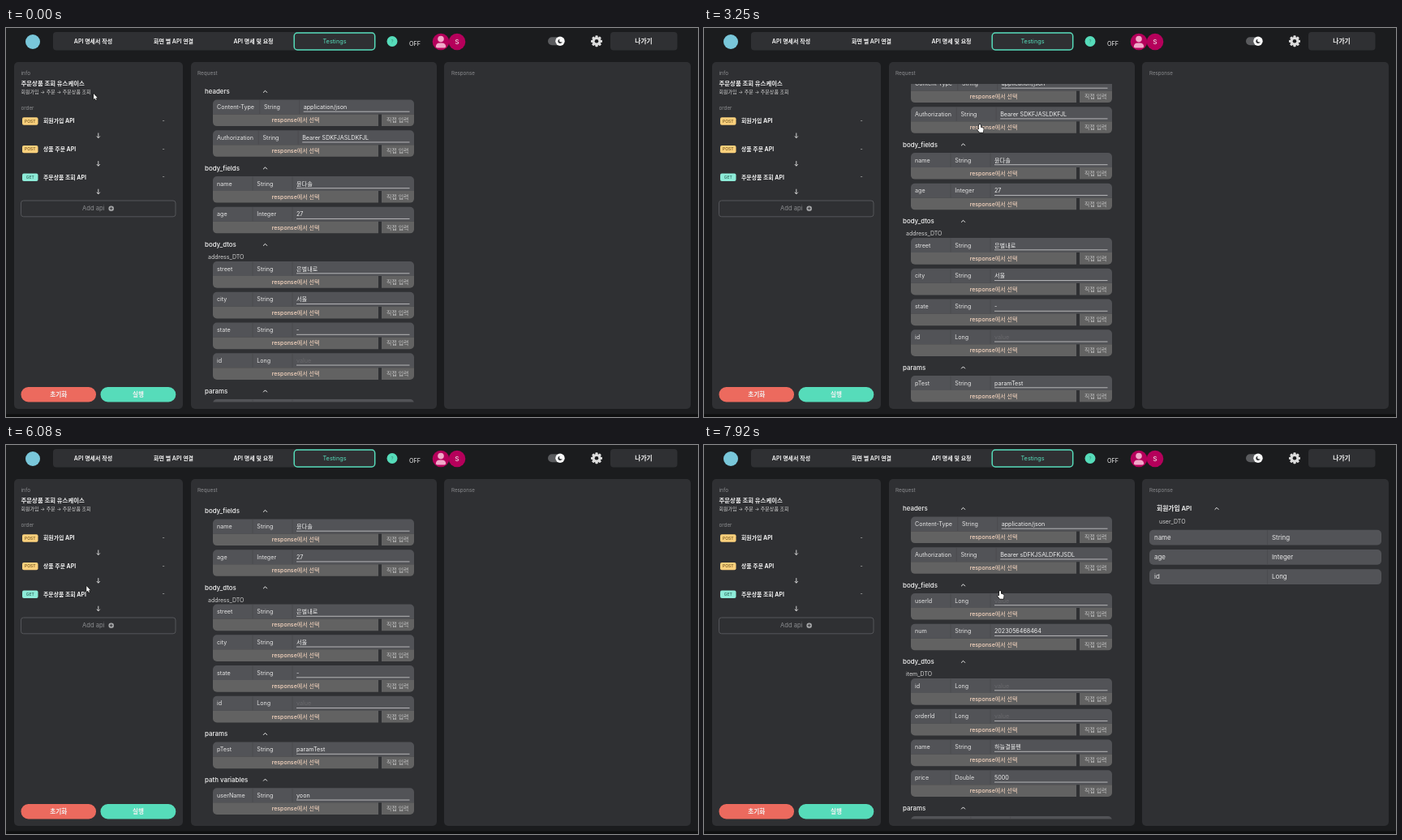
Write an HTML page with a canvas that moves like this. It is 853 px wide and 480 px high and loops after 8000 ms.

```html
<!DOCTYPE html>
<html lang="ko">
<head>
<meta charset="utf-8">
<title>API testing screen</title>
<style>
html, body { margin: 0; width: 100%; height: 100%; overflow: hidden; background: #1b1c1e; }
canvas { display: block; width: 853px; height: 480px; }
</style>
</head>
<body>
<canvas id="stage"></canvas>
<script>
const W = 853, H = 480, LOOP = 8000, FRAMES = 96, STEP = LOOP / FRAMES;
const FONT = 'Inter, "Noto Sans CJK KR", "Noto Sans CJK JP", "Noto Sans CJK", sans-serif';
const PAGE = '#1b1c1e', PANEL = '#2f3033', CARD = '#525357', STRIP = '#626262';
const MINT = '#56dcba', PINK = '#b5005b', WHITE = '#f2f2f2', GRAY = '#8b8c8f';
const CLICK = 77;

const canvas = document.getElementById('stage');
const ctx = canvas.getContext('2d');
const ratio = window.devicePixelRatio || 1;
canvas.width = Math.round(W * ratio);
canvas.height = Math.round(H * ratio);

const AUTH = 'Bearer ';
const headerRows = token => [
  ['Content-Type', 'String', 'application/json', 318],
  ['Authorization', 'String', AUTH + token, 316.5]
];
// Row: name, type, value, x of the type column
const signUp = [
  { title: 'headers', rows: headerRows('SDKFJASLDKFJL') },
  { title: 'body_fields', rows: [['name', 'String', '윤다솔'], ['age', 'Integer', '27']] },
  { title: 'body_dtos', sub: 'address_DTO', rows: [
    ['street', 'String', '은별내로'], ['city', 'String', '서울'],
    ['state', 'String', '-'], ['id', 'Long', '']] },
  { title: 'params', rows: [['pTest', 'String', 'paramTest']] },
  { title: 'path variables', rows: [['userName', 'String', 'yoon']] }
];
const itemOrder = [
  { title: 'headers', rows: headerRows('sDFKJSALDFKJSDL') },
  { title: 'body_fields', rows: [['userId', 'Long', ''], ['num', 'String', '2023056468464']] },
  { title: 'body_dtos', sub: 'item_DTO', rows: [
    ['id', 'Long', ''], ['orderId', 'Long', ''],
    ['name', 'String', '하늘결볼펜'], ['price', 'Double', '5000']] },
  { title: 'params', rows: [['userAddressStreet', 'String', '은별내로', 334]] }
];
const steps = [['POST', '회원가입 API'], ['POST', '상품 주문 API'], ['GET', '주문상품 조회 API']];
const stepY = i => 115 + i * 34.6;

// Keys: step, then values
const cursorKeys = [
  [0, 108, 81], [4, 72, 82], [9, 60, 112], [12, 62, 113], [15, 70, 147], [18, 72, 148],
  [21, 74, 181], [23, 80, 184], [27, 334, 106], [28, 340, 104], [31, 340, 104],
  [34, 340, 119], [46, 340, 119], [49, 290, 112], [52, 468, 150], [54, 440, 260],
  [57, 356, 362], [61, 353, 359], [64, 350, 385], [66, 362, 440], [68, 340, 350],
  [74, 80, 160], [75, 72, 152], [86, 72, 152], [90, 365, 180], [95, 365, 180]
];
const scrollKeys = [
  [0, 0], [37, 0], [39, 29], [41, 91.5], [76, 91.5], [77, 34.5], [90, 34.5], [93, 0], [95, 0]
];

function sample(keys, k, ease) {
  let i = 0;
  while (i < keys.length - 2 && k >= keys[i + 1][0]) i++;
  const a = keys[i], b = keys[i + 1];
  let u = Math.min(1, Math.max(0, (k - a[0]) / (b[0] - a[0])));
  if (ease) u = u * u * (3 - 2 * u);
  return a.slice(1).map((v, j) => v + (b[j + 1] - v) * u);
}

function text(str, x, y, size, color = WHITE, weight = 400, align = 'left') {
  ctx.font = `${weight} ${size}px ${FONT}`;
  ctx.textAlign = align;
  ctx.fillStyle = color;
  ctx.fillText(str, x, y + size * 0.36);
}

function box(x, y, w, h, r, fill, stroke, lw = 1) {
  ctx.beginPath();
  ctx.roundRect(x, y, w, h, r);
  if (fill) { ctx.fillStyle = fill; ctx.fill(); }
  if (stroke) { ctx.strokeStyle = stroke; ctx.lineWidth = lw; ctx.stroke(); }
}

function disc(x, y, r, fill) {
  ctx.beginPath();
  ctx.arc(x, y, r, 0, Math.PI * 2);
  ctx.fillStyle = fill;
  ctx.fill();
}

function line(points, color, lw) {
  ctx.beginPath();
  points.forEach(([x, y]) => ctx.lineTo(x, y));
  ctx.strokeStyle = color;
  ctx.lineWidth = lw;
  ctx.stroke();
}

const chevron = (x, y) => line([[x - 2.4, y + 1.2], [x, y - 1.2], [x + 2.4, y + 1.2]], WHITE, 1);

function gear(x, y) {
  ctx.save();
  ctx.translate(x, y);
  for (let i = 0; i < 8; i++) {
    box(-1.6, -7, 3.2, 4, 0.8, '#dcdcdc');
    ctx.rotate(Math.PI / 4);
  }
  ctx.restore();
  disc(x, y, 5.4, '#dcdcdc');
  disc(x, y, 2.3, PAGE);
}

function topBar() {
  disc(33, 17, 9, '#79c7da');
  box(58, 5, 397, 22.5, 4, PANEL);
  text('API 명세서 작성', 107.5, 16.5, 7, WHITE, 600, 'center');
  text('화면 별 API 연결', 206.5, 16.5, 7, WHITE, 600, 'center');
  text('API 명세 및 요청', 305, 16.5, 7, WHITE, 600, 'center');
  box(355.2, 6, 99.5, 21, 4, PANEL, MINT, 1.5);
  text('Testings', 405, 16.5, 7.3, MINT, 400, 'center');
  disc(476, 16.5, 6.5, MINT);
  text('?', 476, 16.5, 6, '#3a8f7c', 400, 'center');
  text('OFF', 497, 19, 7.2);

  disc(536, 17, 10.3, PINK);
  disc(536, 13.6, 3.8, '#f0a9c9');
  box(529.8, 18.4, 12.4, 6, [5, 5, 2, 2], '#f0a9c9');
  disc(556, 17, 10.3, PINK);
  text('S', 556, 17.3, 7.5, WHITE, 500, 'center');

  box(668, 11.3, 20, 10, 5, '#5a5b5e');
  disc(683, 16.3, 5.7, '#fafafa');
  disc(683, 16.3, 2.6, '#2c2d30');
  disc(684.3, 15.2, 2.2, '#fafafa');
  gear(728, 16.3);
  box(745, 5, 82.5, 22.5, 4, PANEL);
  text('나가기', 786, 16, 7.8, WHITE, 600, 'center');
}

function leftPanel(px, py) {
  box(10, 42, 208, 428, 5, PANEL);
  text('info', 18.5, 55.5, 6.5, GRAY);
  text('주문상품 조회 유스케이스', 18.5, 68, 7.4, WHITE, 700);
  text('회원가입 -> 주문 -> 주문상품 조회', 18.5, 78.5, 6, '#d2d2d2');
  text('order', 18.5, 98.5, 6.3, GRAY);

  steps.forEach(([method, label], i) => {
    const y = stepY(i), post = method === 'POST';
    if (hovers(i, px, py)) box(18, y - 9.5, 191, 19, 3, '#3b3b40');
    box(20, y - 4.7, 19.5, 9.4, 2, post ? '#fbd07c' : '#8debd8');
    text(method, 29.7, y, 5, post ? '#6e5520' : '#2c665a', 500, 'center');
    text(label, 46, y, 6.9, WHITE, 700);
    text('-', 194, y - 0.5, 7, '#c4c4c4', 400, 'center');
    const ay = y + 17.7;
    line([[113.8, ay - 3.2], [113.8, ay + 2.8]], '#e2e2e2', 0.9);
    line([[111.8, ay + 0.8], [113.8, ay + 3], [115.8, ay + 0.8]], '#e2e2e2', 0.9);
  });

  box(18.5, 213, 190.5, 19.8, 3, null, '#55565a', 1);
  text('Add api', 94, 222.7, 7.6, GRAY);
  disc(129.7, 222.7, 3.3, '#a5a6a8');
  line([[127.9, 222.7], [131.5, 222.7]], PANEL, 0.9);
  line([[129.7, 220.9], [129.7, 224.5]], PANEL, 0.9);
  box(18.5, 443, 92.5, 18.5, 9, '#ec6a5e');
  text('초기화', 64.7, 452.2, 7.6, WHITE, 600, 'center');
  box(116.5, 443, 92.8, 18.5, 9, MINT);
  text('실행', 163, 452.2, 7.6, WHITE, 600, 'center');
}

function fieldRow([name, type, value, col = 309.3], y) {
  const vx = col + 48.7;
  box(255, y - 9, 248, 18, [5, 5, 0, 0], CARD);
  box(255, y + 9, 204, 14.6, [0, 0, 0, 5], STRIP);
  box(463, y + 9, 40, 14.6, [0, 0, 5, 0], STRIP);
  for (const x of [col - 5.3, vx - 5]) line([[x, y - 8.5], [x, y + 8.5]], '#49494d', 0.8);
  text(name, 260, y, 7.15, '#e4e4e4');
  text(type, col, y, 7.15, '#e4e4e4');
  text(value || 'value', vx, y, 7.15, value ? '#f0f0f0' : '#69696d');
  line([[vx, y + 5.7], [497.5, y + 5.7]], '#c2c2c4', 0.9);
  text('response에서 선택', 357, y + 16.3, 7, '#fbd9c2', 500, 'center');
  text('직접 입력', 482.7, y + 16.3, 6.9, '#c6c6c6', 400, 'center');
}

function requestPanel(sections, scroll) {
  box(228, 42, 303, 428, 5, PANEL);
  text('Request', 236, 55.5, 6.4, GRAY);
  ctx.save();
  ctx.beginPath();
  ctx.rect(236, 69, 290, 392.5);
  ctx.clip();
  let y = 78.5 - scroll;
  for (const { title, sub, rows } of sections) {
    text(title, 245, y, 7.9, WHITE, 500);
    chevron(319.5, y);
    if (sub) {
      text(sub, 249, y + 15, 7, '#d0d0d0');
      y += 10.6;
    }
    y += 19;
    for (const row of rows) {
      fieldRow(row, y);
      y += 37.75;
    }
  }
  ctx.restore();
}

function responsePanel(filled) {
  box(540, 42, 304, 428, 5, PANEL);
  text('Response', 549, 55.5, 6.2, GRAY);
  if (!filled) return;
  text('회원가입 API', 558, 78, 7.75, WHITE, 600);
  chevron(632, 78.5);
  text('user_DTO', 561, 94, 7, '#d0d0d0');
  [['name', 'String'], ['age', 'Integer'], ['id', 'Long']].forEach(([name, type], i) => {
    const y = 114 + i * 24.3;
    box(549, y - 9.3, 286, 18.8, 5, CARD);
    line([[694.5, y - 9], [694.5, y + 9]], '#49494d', 0.8);
    text(name, 555, y, 7.9, '#e8e8e8');
    text(type, 700, y, 7.9, '#e8e8e8');
  });
}

const hovers = (i, x, y) => x > 18 && x < 209 && Math.abs(y - stepY(i)) < 9.5;

function shape(x, y, path) {
  const p = new Path2D(path);
  ctx.save();
  ctx.translate(x, y);
  ctx.lineJoin = 'round';
  ctx.lineWidth = 1.2;
  ctx.strokeStyle = '#111';
  ctx.stroke(p);
  ctx.fillStyle = '#fff';
  ctx.fill(p);
  ctx.restore();
}

function cursor(x, y, k) {
  const inRequest = x > 240 && x < 505;
  if (inRequest && k < 32) {
    line([[x, y - 4], [x, y + 4]], '#0c0c0c', 0.9);
    line([[x - 1.5, y - 4], [x + 1.5, y - 4]], '#0c0c0c', 0.8);
    line([[x - 1.5, y + 4], [x + 1.5, y + 4]], '#0c0c0c', 0.8);
  } else if (inRequest || steps.some((_, i) => hovers(i, x, y))) {
    shape(x, y, 'M-1 .5Q0-.7 1 .5V3.6L4 4.4Q4.8 4.8 4.6 6L4 9.8H-.3L-3 6.6Q-2.6 5.2-1 6.3Z');
  } else {
    shape(x, y, 'M0 0V7L1.6 5.6L2.7 8L3.7 7.5L2.7 5.2H4.9Z');
  }
}

function draw(k) {
  const [px, py] = sample(cursorKeys, k, true);
  const [scroll] = sample(scrollKeys, k);
  const ordered = k >= CLICK;
  ctx.setTransform(ratio, 0, 0, ratio, 0, 0);
  ctx.fillStyle = PAGE;
  ctx.fillRect(0, 0, W, H);
  ctx.fillStyle = '#0e0f10';
  ctx.fillRect(0, 476.5, W, 3.5);
  topBar();
  leftPanel(px, py);
  requestPanel(ordered ? itemOrder : signUp, scroll);
  responsePanel(ordered);
  cursor(px, py, k);
}

const start = performance.now();
function tick() {
  // The screen updates twelve times a second; the small lead absorbs rounding.
  const t = (performance.now() - start + 5) % LOOP;
  draw(Math.floor(t / STEP));
  requestAnimationFrame(tick);
}
tick();
</script>
</body>
</html>
```
